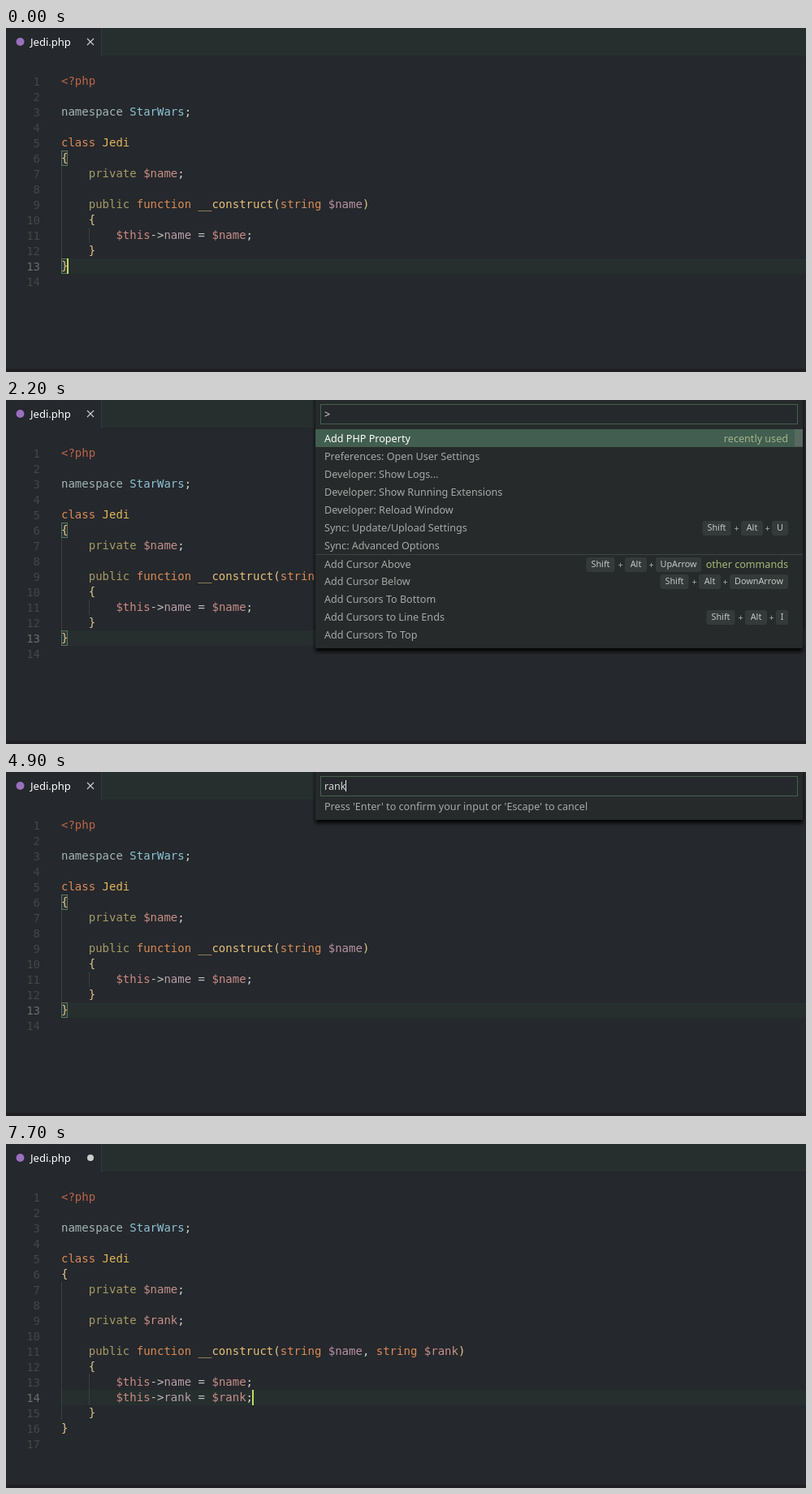
Write an HTML page that moves like this. It is 985 px wide and 424 px high and loops after 8000 ms.

```html
<!DOCTYPE html>
<html lang="en">
<head>
<meta charset="utf-8">
<title>Add PHP Property</title>
<style>
  html, body { margin: 0; width: 100%; height: 100%; overflow: hidden; background: #25282c; }
  svg { display: block; width: 985px; height: 424px; }
  text { white-space: pre; }
  .code { font: 14px "DejaVu Sans Mono", monospace; }
  .ui { font: 12.6px "Noto Sans", sans-serif; }
  .key { font: 10.8px "Noto Sans", sans-serif; }
  .tab { font: 500 13px "Noto Sans", sans-serif; }
</style>
</head>
<body>
<svg id="stage" viewBox="0 0 985 424"></svg>
<script>
const LOOP = 8000;
const CHAR = 8.428, LEFT = 68, TOP = 56, LINE = 19;
const stage = document.getElementById('stage');

const color = {
  tag: '#bd6549', ns: '#a3b5b6', path: '#8cc3d4', plain: '#cfd3c6', kw: '#d98b56',
  cls: '#dfb659', brace: '#e1c591', mod: '#a59a66', prop: '#c78f89', fn: '#e3c078',
  param: '#b892a0', self: '#cb8a82', member: '#b89fa8', op: '#bfc2bb'
};

const esc = s => s.replace(/&/g, '&amp;').replace(/</g, '&lt;').replace(/>/g, '&gt;');
const rect = (x, y, w, h, fill, extra = '') =>
  `<rect x="${x}" y="${y}" width="${w}" height="${h}" fill="${fill}" ${extra}/>`;
const text = (x, y, s, fill, cls = 'ui', anchor = 'start') =>
  `<text x="${x}" y="${y}" class="${cls}" fill="${fill}" text-anchor="${anchor}">${esc(s)}</text>`;
const rowTop = n => TOP + (n - 1) * LINE;
const colX = c => LEFT + c * CHAR;

// A line of code is a flat list: token kind, text, token kind, text, ...
function codeLine(n, tokens) {
  let spans = '';
  for (let i = 0; i < tokens.length; i += 2)
    spans += `<tspan fill="${color[tokens[i]]}">${esc(tokens[i + 1])}</tspan>`;
  return `<text x="${LEFT}" y="${rowTop(n) + 14}" class="code">${spans}</text>`;
}

const property = name => ['mod', '    private ', 'prop', '$' + name, 'plain', ';'];
const assign = name => ['self', '        $this', 'op', '->', 'member', name, 'op', ' = ',
  'prop', '$' + name, 'plain', ';'];

function source(added, typed) {
  const hint = typed.endsWith(' ') ? 'kw' : 'ns';
  return [
    ['tag', '<?php'], [],
    ['ns', 'namespace ', 'path', 'StarWars', 'plain', ';'], [],
    ['kw', 'class ', 'cls', 'Jedi'],
    ['brace', '{'],
    property('name'), [],
    ...(added ? [property('rank'), []] : []),
    ['mod', '    public ', 'kw', 'function ', 'fn', '__construct', 'brace', '(',
      'kw', 'string ', 'param', '$name',
      ...(added ? ['plain', ', ', hint, typed, 'prop', '$rank'] : []), 'brace', ')'],
    ['brace', '    {'],
    assign('name'),
    ...(added ? [assign('rank')] : []),
    ['brace', '    }'],
    ['brace', '}'], []
  ];
}

function tabs(dirty) {
  const mark = dirty
    ? '<circle cx="104" cy="17" r="4" fill="#c9cdca"/>'
    : '<path d="M100 13l8 8m0-8l-8 8" stroke="#cdd1ce" stroke-width="1.1"/>';
  return rect(118, 0, 867, 34, '#262f2e') + rect(117, 0, 1, 34, '#303a38') +
    '<circle cx="17.5" cy="17" r="5" fill="#9a70bd"/>' +
    text(30, 22, 'Jedi.php', '#fff', 'tab') + mark;
}

function editor(s) {
  const lines = source(s.added, s.typed);
  const last = lines.length - 1;
  const guide = (col, from, to, fill) =>
    rect(Math.round(colX(col)), rowTop(from), 1, rowTop(to) - rowTop(from), fill);
  let out = rect(LEFT, rowTop(s.line), 985 - LEFT, LINE, '#262f2e');
  out += guide(0, 7, last, '#3d403f');
  out += s.added ? guide(4, 13, 15, '#3d403f') : guide(4, 11, 12, '#3d403f');
  if (s.added && s.line === 11) {
    out += rect(456, rowTop(11), Math.max(2, s.typed.length * CHAR), LINE, '#7c7c7c', 'fill-opacity=".35"');
    out += rect(303, rowTop(14), 2, LINE, '#56605a');
  }
  if (!s.added)
    for (const n of [6, last])
      out += rect(68.5, rowTop(n) + .5, 7, 18, '#2b3431', 'stroke="#5d7464"');
  lines.forEach((tokens, i) => {
    const n = i + 1;
    out += text(42, rowTop(n) + 15, String(n), n === s.line ? '#696f6a' : '#434845', 'code', 'end');
    out += codeLine(n, tokens);
  });
  if (s.cursor) out += rect(Math.round(colX(s.col) - 1), rowTop(s.line), 2, LINE, '#bfdc62');
  return out;
}

function panel(height, content) {
  return rect(381, -6, 600, height + 6, '#252b2b', 'filter="url(#shadow)"') +
    rect(387.5, 5.5, 587, 24, '#25292b', 'stroke="#466052"') + content;
}

const commands = ['Add PHP Property', 'Preferences: Open User Settings', 'Developer: Show Logs...',
  'Developer: Show Running Extensions', 'Developer: Reload Window', 'Sync: Update/Upload Settings',
  'Sync: Advanced Options', 'Add Cursor Above', 'Add Cursor Below', 'Add Cursors To Bottom',
  'Add Cursors to Line Ends', 'Add Cursors To Top'];
const rowBase = i => 52 + 22 * i + (i === 7 ? 1 : 0);

function shortcut(row, right, key, width) {
  const base = rowBase(row);
  const cap = (x, w, label) =>
    rect(x, base - 13, w, 18, '#343a3a', 'rx="3"') + text(x + w / 2, base - 1, label, '#c3c8c4', 'key', 'middle');
  const plus = x => text(x, base, '+', '#a7aca8', 'key', 'middle');
  const x = right - width;
  return cap(x - 85.5, 35, 'Shift') + plus(x - 43.5) + cap(x - 38, 27, 'Alt') + plus(x - 5.5) + cap(x, width, key);
}

function palette(s) {
  let out = rect(381, 36, 600, 22, '#425e50');
  if (s.scrollbar) out += rect(971, 36, 10, 21, '#57695f');
  out += rect(381, 190, 600, 1, '#3c4543');
  out += text(392, 22, '>', '#d5dad6');
  if (s.inputCursor) out += rect(399, 11, 1, 14, '#e4e8e4');
  commands.forEach((label, i) => out += text(392, rowBase(i), label, i ? '#a5aaa7' : '#fff'));
  out += text(963, 52, 'recently used', '#a3b28b', 'ui', 'end');
  out += text(963, 207, 'other commands', '#a3b878', 'ui', 'end');
  out += shortcut(5, 963, 'U', 20) + shortcut(7, 856, 'UpArrow', 56) +
    shortcut(8, 963, 'DownArrow', 72) + shortcut(10, 963, 'I', 15);
  return panel(306, out);
}

const inputX = { '': 392, r: 397, ran: 411, rank: 418 };

function prompt(s) {
  let out = s.input
    ? text(392, 22, s.input, '#d5dad6')
    : text(392, 22, 'Enter the property name', '#656b69');
  if (s.inputCursor) out += rect(inputX[s.input], 10, 1, 14, '#e4e8e4');
  out += text(392, 47, "Press 'Enter' to confirm your input or 'Escape' to cancel", '#a5aaa7');
  return panel(59, out);
}

// Latest value whose start time has passed; steps are [start, value].
const at = (t, steps) => steps.reduce((v, [start, value]) => t >= start ? value : v, steps[0][1]);

function stateAt(t) {
  const added = t >= 5400;
  const typed = at(t, [[0, ''], [6200, 's'], [6400, 'st'], [6600, 'str'], [6700, 'stri'],
    [6900, 'string'], [7200, 'string ']]);
  const signature = added && t < 7700;
  return {
    added, typed,
    line: !added ? 13 : signature ? 11 : 14,
    col: !added ? 1 : signature ? 46 + typed.length : 28,
    cursor: at(t, [[0, true], [400, false], [5300, true], [5900, false], [6200, true]]),
    overlay: at(t, [[0, ''], [700, 'palette'], [2300, 'prompt'], [5300, '']]),
    scrollbar: t >= 800,
    input: at(t, [[0, ''], [4500, 'r'], [4700, 'ran'], [4900, 'rank']]),
    inputCursor: at(t, [[700, true], [1200, false], [1700, true], [2200, false], [2300, true],
      [2900, false], [3500, true], [3900, false], [4400, true]])
  };
}

const defs = '<defs><filter id="shadow" x="-5%" y="-20%" width="110%" height="150%">' +
  '<feDropShadow dx="0" dy="4" stdDeviation="2.6" flood-color="#000" flood-opacity=".95"/></filter></defs>';
const overlays = { palette, prompt };
let shown = '';

function draw(t) {
  const s = stateAt(t);
  const id = JSON.stringify(s);
  if (id === shown) return;
  shown = id;
  stage.innerHTML = defs + rect(0, 0, 985, 424, '#25282c') + rect(0, 420, 985, 4, '#211f23') +
    tabs(s.added) + editor(s) + (s.overlay ? overlays[s.overlay](s) : '');
}

const begin = performance.now();
function tick() {
  draw((performance.now() - begin) % LOOP);
  requestAnimationFrame(tick);
}
tick();
</script>
</body>
</html>
```
